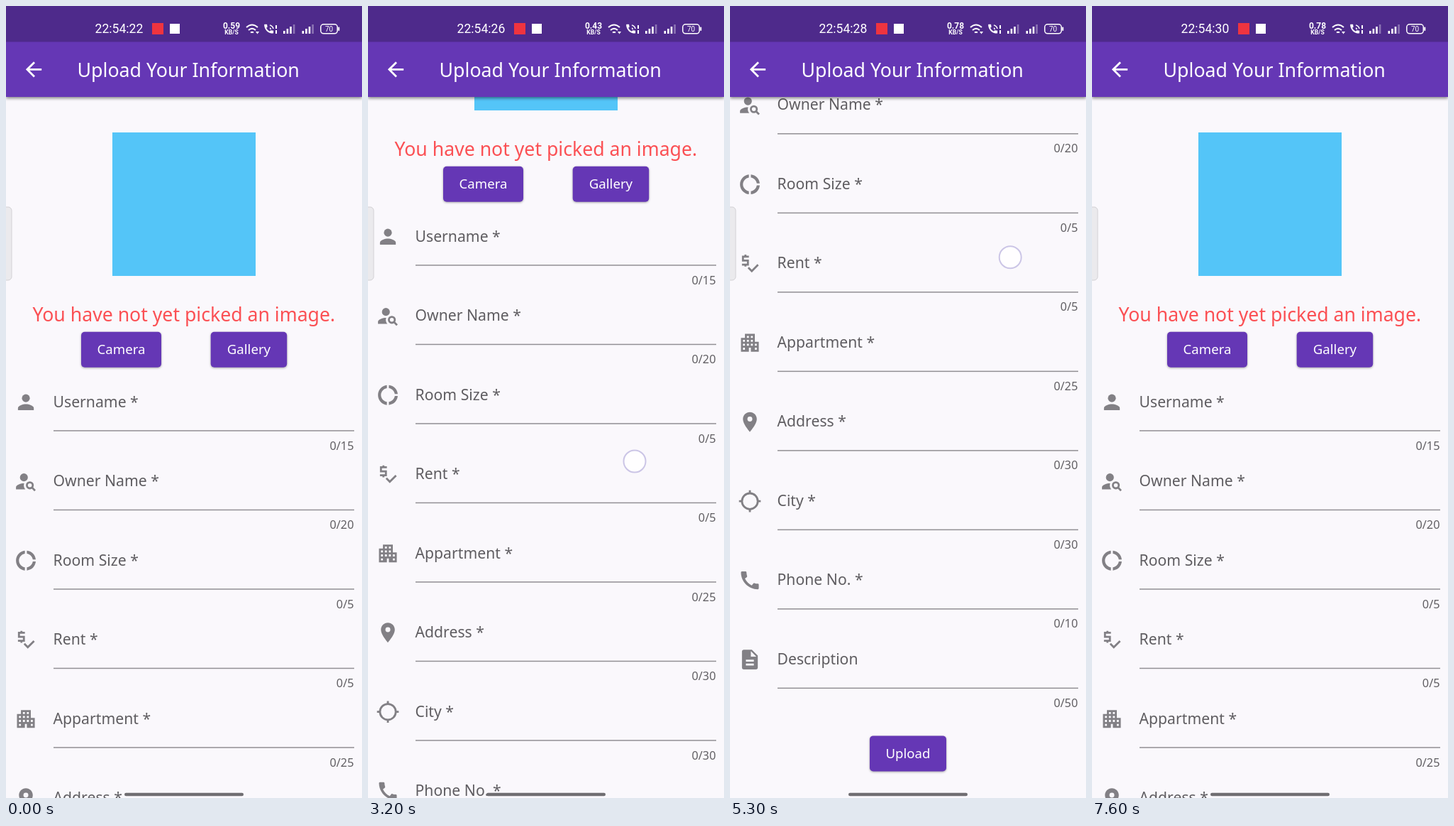
Animation, 502 px wide and 1115 px high, one loop 8000 ms. Source, as an HTML page:

```html
<!DOCTYPE html>
<html lang="en">
<head>
<meta charset="utf-8">
<title>Upload form</title>
<style>
  html, body { margin: 0; width: 100%; height: 100%; overflow: hidden; background: #faf8fc; }
  svg { display: block; font-family: "Noto Sans", "Open Sans", sans-serif; }
  .label { font-size: 21.2px; fill: #5f5d61; }
  .count { font-size: 16.3px; fill: #626064; text-anchor: end; }
  .button rect { fill: #6537b5; filter: drop-shadow(0 1.5px 1.5px #0005); }
  .button text { font-size: 18.6px; fill: #fff; text-anchor: middle; }
  .icon { fill: #828085; }
  .line { fill: none; stroke: #828085; stroke-width: 2; }
  .window { fill: none; stroke: #faf8fc; stroke-width: 2; stroke-dasharray: 2; }
  .status { font-family: Roboto, Inter, sans-serif; fill: #fff; }
</style>
</head>
<body>
<svg width="502" height="1115" viewBox="0 0 502 1115">
  <g id="page">
    <rect x="150" y="178" width="202" height="202" fill="#54c5f8"/>
    <text x="37.500" y="444" font-size="26.650" fill="#fb5054">You have not yet picked an image.</text>
  </g>
  <rect x="-8" y="283" width="16" height="103" rx="5" fill="#ebeaed" stroke="#d2d1d4"/>
  <rect y="50" width="502" height="78" fill="#6537b5" style="filter: drop-shadow(0 2px 2px #0007)"/>
  <rect width="502" height="50.500" fill="#4e2a8b"/>
  <path transform="translate(22.3 72.6) scale(1.394)" fill="#fff"
    d="M20 11H7.83l5.59-5.59L12 4l-8 8 8 8 1.41-1.41L7.83 13H20z"/>
  <text x="100.500" y="99.500" font-size="26.750" fill="#fff">Upload Your Information</text>
  <g class="status">
    <text id="clock" x="125.5" y="38.3" font-size="17.6"></text>
    <rect x="206" y="24" width="16" height="16" fill="#ef343f"/>
    <rect x="231" y="25" width="14" height="14"/>
    <g text-anchor="middle" font-weight="700">
      <text id="speed" x="318" y="32" font-size="12"></text>
      <text x="318" y="40.3" font-size="8.6">KB/S</text>
    </g>
    <path d="M339 30q8-7 16 0M342 34q5-4.500 10 0M345 37.500q2-1.500 4 0M381 27v5M381 34v5" fill="none" stroke="#fff" stroke-width="2"/>
    <path d="M352 36h5l-2.500 3.500z"/>
    <path d="M372 27q4 1 5 5M372 31q1 .5 1.500 2" fill="none" stroke="#fff" stroke-width="1.500"/>
    <g id="signal"></g>
    <rect x="443.800" y="25.800" width="23.500" height="13" rx="4" fill="none" stroke="#fff" stroke-width="1.500"/>
    <rect x="468.300" y="29.500" width="2" height="5.500" rx="1"/>
    <text x="455.500" y="36" font-size="10" text-anchor="middle">70</text>
  </g>
  <rect x="167" y="1107.700" width="168" height="4.600" rx="2.300" fill="#706e72"/>
  <circle id="touch" r="15.500" fill="#fff" fill-opacity=".85" stroke="#cbc5e6" stroke-width="2"/>
</svg>
<script>
const $ = id => document.getElementById(id);
const path = (d, cls = 'icon') => `<path class="${cls}" d="${d}"/>`;
const disc = (x, y, r, cls = 'icon') => `<circle class="${cls}" cx="${x}" cy="${y}" r="${r}"/>`;
const handset = 'M20 15.400c-1.200 0-2.400-.2-3.500-.6-.4-.1-.8 0-1 .3l-1.600 2c-2.800-1.400-5.500-3.900-6.900-6.900l2-1.600c.2-.3.300-.7.200-1-.4-1.100-.6-2.300-.6-3.600 0-.5-.4-1-1-1H4.200C3.700 3 3 3.200 3 4 3 13.300 10.700 21 20 21c.7 0 1-.6 1-1.200v-3.400c0-.6-.4-1-1-1z';

// Icons on a 24 unit grid
const icons = {
  person: disc(12, 8, 4) + path('M12 14c-2.670 0-8 1.340-8 4v2h16v-2c0-2.660-5.330-4-8-4z'),
  search: disc(10, 8, 4) + path('M10.350 14C7.600 13.900 2 15.300 2 18v2h9.500c-2.500-2.800-1.200-5.900-1.150-6z')
    + disc(16, 16, 3, 'line') + path('M18.200 18.200l3.100 3.100', 'line'),
  donut: path('M11 5.080V2c-5 .5-9 4.810-9 10s4 9.500 9 10v-3.080c-3-.48-6-3.400-6-6.920s3-6.440 6-6.920zM19 11h3c-.5-5-4-8.500-9-9v3.080c3 .43 5.540 2.920 6 5.920zM13 18.920V22c5-.47 8.530-4 9-9h-3c-.46 3-3 5.490-6 5.920z'),
  price: path('M11 5H5v4h5v4H4M7.500 3v2M7.500 13v2M10.400 16l3.530 3.600 6.370-6.400', 'line'),
  building: path('M17 11V3H7v4H3v14h8v-4h2v4h8V11z') + path('M6 9V19M10 5V15M14 5V15M18 13V19', 'window'),
  pin: path('M12 2C8.130 2 5 5.130 5 9c0 5.250 7 13 7 13s7-7.750 7-13c0-3.870-3.130-7-7-7zm0 9.500a2.500 2.500 0 1 1 0-5 2.500 2.500 0 0 1 0 5z'),
  target: disc(12, 12, 8, 'line') + path('M12 1v3M12 20v3M1 12h3M20 12h3', 'line'),
  phone: path(handset),
  page: path('M14 2H6a2 2 0 0 0-2 2v16a2 2 0 0 0 2 2h12a2 2 0 0 0 2-2V8zm2 16H8v-2h8zm0-4H8v-2h8zm-3-5V3.500L18.500 9z')
};

const fields = [
  ['person', 'Username *', 15], ['search', 'Owner Name *', 20], ['donut', 'Room Size *', 5],
  ['price', 'Rent *', 5], ['building', 'Appartment *', 25], ['pin', 'Address *', 30],
  ['target', 'City *', 30], ['phone', 'Phone No. *', 10], ['page', 'Description', 50]
];
const field = ([icon, label, max], i) => `<g transform="translate(0 ${541 + 111.5 * i})">
  <g transform="translate(11.3 0) scale(1.394)">${icons[icon]}</g>
  <text class="label" x="66.500" y="23.500">${label}</text>
  <rect x="67" y="56.200" width="424" height="1.500" fill="#929094"/>
  <text class="count" x="490.500" y="83.500">0/${max}</text></g>`;
const button = (x, y, w, label) => `<g class="button">
  <rect x="${x}" y="${y}" width="${w}" height="50" rx="5"/>
  <text x="${x + w / 2}" y="${y + 31.5}">${label}</text></g>`;

const add = (id, html) => $(id).insertAdjacentHTML('beforeend', html);
add('page', button(106, 458.7, 113, 'Camera') + button(288.7, 458.7, 107.5, 'Gallery')
  + fields.map(field).join('') + button(197, 1557, 108, 'Upload'));
for (const x of [391, 417.5]) for (let i = 0; i < 4; i++)
  add('signal', `<rect x="${x + i * 4.6}" y="${35 - i * 3}" width="2.600" height="${4 + i * 3}" opacity="${i < 3 ? 1 : .35}"/>`);
add('signal', `<g transform="translate(362 23.500) scale(.72)">${path(handset, '')}</g>`);

// Monotone cubic through [time, value] points
function curve(points) {
  const gap = i => points[i + 1][0] - points[i][0];
  const rise = i => (points[i + 1][1] - points[i][1]) / gap(i);
  const slope = i => {
    if (i == 0 || i == points.length - 1) return 0;
    const a = rise(i - 1), b = rise(i);
    return a * b > 0 ? 2 * a * b / (a + b) : 0;
  };
  return t => {
    if (t <= points[0][0]) return points[0][1];
    const i = points.findIndex((p, k) => k < points.length - 1 && t < points[k + 1][0]);
    if (i < 0) return points.at(-1)[1];
    const h = gap(i), u = (t - points[i][0]) / h, v = 1 - u;
    return points[i][1] * v * v * (1 + 2 * u) + points[i + 1][1] * u * u * (3 - 2 * u)
      + h * u * v * (slope(i) * v - slope(i + 1) * u);
  };
}
const scroll = curve([[1800, 0], [2600, 99], [3200, 233], [4300, 573], [5050, 573],
  [5800, 326], [6150, 177], [6400, 90], [6800, 0]]);
const touchX = curve([[1700, 362], [2600, 367], [3200, 376], [4300, 425], [4700, 439],
  [4950, 402], [5800, 390], [6250, 387]]);
const touchY = curve([[1700, 893], [2600, 777], [3200, 641], [4300, 301], [4700, 238],
  [4950, 264], [5800, 530], [6250, 679]]);
const touchAlpha = curve([[1600, 0], [1800, 1], [4600, 1], [4700, .75], [4850, 0],
  [4900, 0], [5050, 1], [6200, 1], [6400, .12], [6500, 0]]);

function draw(now) {
  const t = Math.floor(now % 8000 / 100) * 100;
  $('page').setAttribute('transform', `translate(0 ${-scroll(t)})`);
  $('clock').textContent = '22:54:' + (23 + Math.floor((t - 100) / 1000));
  $('speed').textContent = t < 1100 ? '0.59' : t < 4100 ? '0.43' : '0.78';
  $('touch').setAttribute('transform', `translate(${touchX(t)} ${touchY(t)})`);
  $('touch').setAttribute('opacity', touchAlpha(t));
}
let start;
function tick(now) {
  start ??= now;
  draw(now - start);
  requestAnimationFrame(tick);
}
draw(0);
requestAnimationFrame(tick);
</script>
</body>
</html>
```
